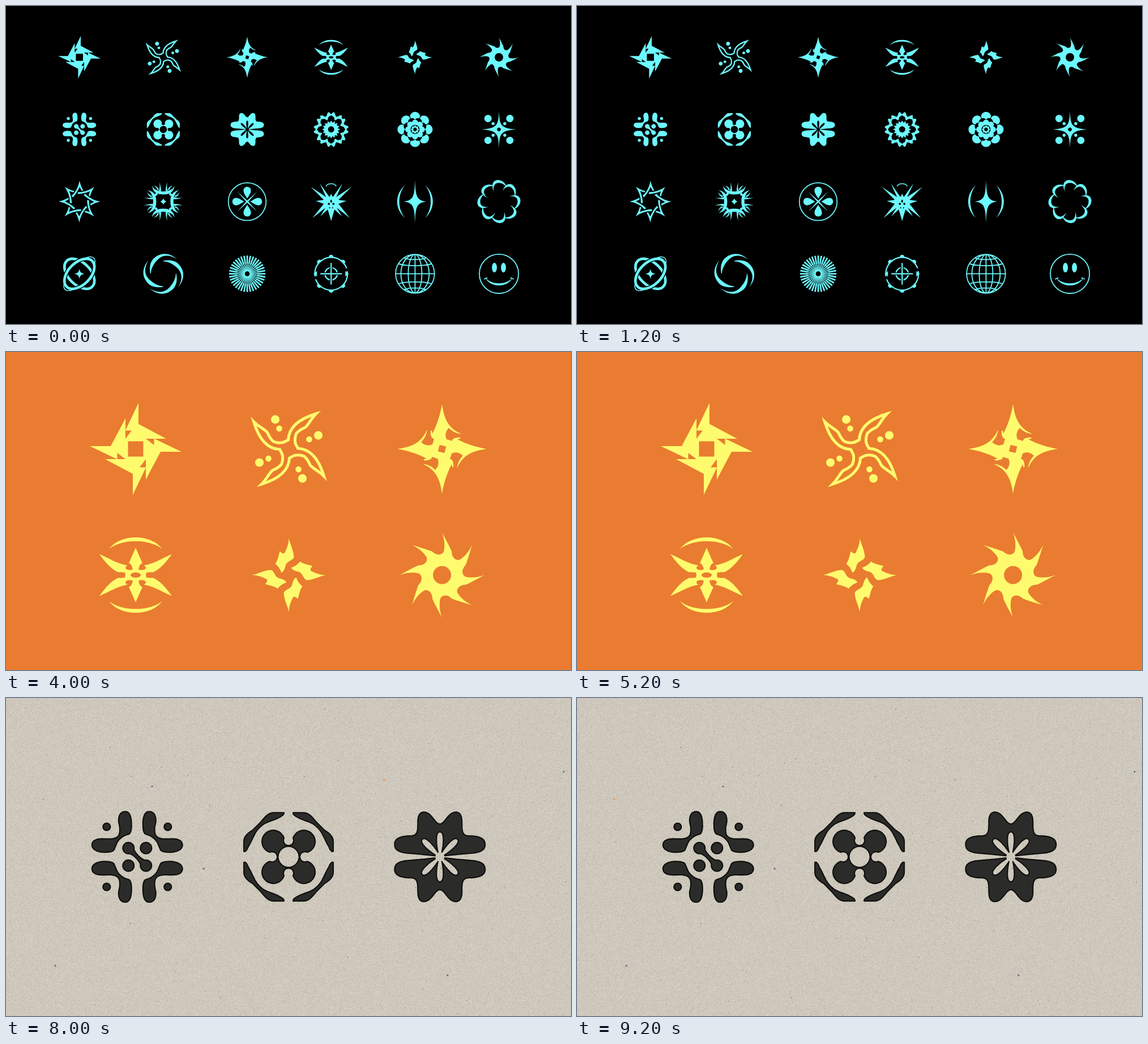
Recreate the animation shown at these times as an HTML page with a canvas. Size 998 by 561 pixels, loop 10000 ms.

```html
<!DOCTYPE html>
<html lang="en">
<head>
<meta charset="utf-8">
<title>Symbol set</title>
<style>
html, body { margin: 0; width: 100%; height: 100%; overflow: hidden; background: #000; }
canvas { display: block; }
</style>
</head>
<body>
<canvas id="stage" width="998" height="561"></canvas>
<script>
const W = 998, H = 561, HOLD = 2000;

// Path helpers: every path is a string of absolute "x y" pairs.
const tf = (d, a, b, c, e, dx = 0, dy = 0) =>
  d.replace(/(-?[\d.]+) (-?[\d.]+)/g, (_, x, y) =>
    (a * x + c * y + dx).toFixed(2) + ' ' + (b * x + e * y + dy).toFixed(2));
const spin = (d, deg) => {
  const t = deg * Math.PI / 180, c = Math.cos(t), s = Math.sin(t);
  return tf(d, c, s, -s, c);
};
const turn = (n, d, start = 0) =>
  Array.from({ length: n }, (_, i) => spin(d, start + i * 360 / n)).join('');
const loop = (n, d) => 'M' + turn(n, d).slice(1) + 'Z';
const flipX = d => d + tf(d, -1, 0, 0, 1);
const flipY = d => d + tf(d, 1, 0, 0, -1);
const quad = d => flipY(flipX(d));
const UNIT = 'M-1 0C-1 -.55 -.55 -1 0 -1C.55 -1 1 -.55 1 0C1 .55 .55 1 0 1C-.55 1 -1 .55 -1 0Z';
const dot = (x, y, r, q = r) => tf(UNIT, r, 0, 0, q, x, y);

const petal = 'M0 0C-4 -10 -9 -43 0 -43C9 -43 4 -10 0 0Z';
const orbit = dot(0, 0, 32, 19.5);

// Each icon: scale, then parts that alternately add and cut.
// A part is a filled path or [path, line width].
const icons = [
  [.4625, loop(4, 'L5 -81L5 -44L54 -18L33 -18'),
    turn(4, 'M18 -18L32.5 -18L32.5 -7Z') + 'M-13.5 -13.5L13.5 -13.5L13.5 13.5L-13.5 13.5Z'],
  [.4625, [loop(4, 'L-1 -16C0 -38 18 -53 48 -62C38 -52 36 -44 29 -38C20 -34 16 -31 13 -27C10 -20 10 -10 14 -5'), 5], '',
    turn(4, dot(-24, -52, 7.5) + dot(-17, -36, 5.3))],
  [.4625, loop(4, 'L0 -79C3 -58 8 -38 33 -27L32 -18L27 -17C40 -10 60 -3 79 0').replace(/Z$/, '') + 'Z',
    turn(4, 'M37 -26C24 -27 17 -32 12 -37C6 -31 5 -24 8 -17L18 -14C18 -19 24 -21 37 -20Z') +
    spin('M-6 -6L6 -6L6 6L-6 6Z', 15)],
  [.4625, flipY('M-47 -46C-27 -73.5 27 -73.5 47 -46C25 -64.5 -25 -64.5 -47 -46Z' +
      'M0 -48L12 -21C8 -20 6 -16 5 -9L-5 -9C-6 -16 -8 -20 -12 -21Z') +
      quad('M64 -37C46 -29 32 -20 15 -17L8 -4L31 -5C44 -11 54 -23 64 -37Z') + dot(0, 0, 20, 10),
    dot(0, 0, 9, 4.5) + flipX(dot(26, 0, 8, 5)) + quad(dot(12, -13, 6, 4))],
  [.4625, turn(4, 'M0 -65C2 -55 8 -45 9 -32C7 -25 -1 -26 -5 -19C-7 -14 -7 -8 -13 -4' +
    'C-15 -10 -18 -15 -24 -20C-20 -24 -18 -35 -16 -42C-12 -38 -8 -36 -6 -42C-2 -50 0 -58 0 -65Z')],
  [.4625, loop(8, 'L0 -75C7 -62 13 -51 17 -42C17 -31 24 -25 31 -27C40 -32 48 -42 53 -53'),
    dot(0, 0, 16)],

  [.364, quad('M-21 -81C-11 -81 -9 -68 -9 -56C-9 -46 -11 -40 -15 -39C-26 -36 -32 -30 -35 -24' +
      'L-40 -12C-42 -8 -50 -7 -58 -7C-70 -7 -81 -12 -81 -21C-81 -30 -72 -33 -62 -33' +
      'C-50 -33 -33 -30 -32 -44C-31 -54 -34 -58 -34 -64C-34 -74 -30 -81 -21 -81Z' + dot(-54, -53, 7.5)) +
    turn(4, dot(15.5, -15.5, 11)) + 'M-7 -20C-5 -8 8 5 20 7L7 20C5 8 -8 -5 -20 -7Z'],
  [.364, quad('M-8 -79L-26 -79C-36 -79 -42 -72 -50 -62L-64 -48C-74 -42 -80 -36 -80 -27L-80 -9' +
      'C-76 -6 -72 -12 -70 -18C-66 -24 -63 -32 -60 -37C-56 -47 -47 -56 -37 -60' +
      'C-30 -63 -18 -66 -9 -73C-7 -76 -6 -78 -8 -79Z' + dot(-27, -27, 21)) +
      'M-26 -26L26 -26L26 26L-26 26Z',
    dot(0, 0, 17.5) + turn(4, dot(0, -29, 8))],
  [.364, flipY(loop(1, 'L0 -59C8 -59 14 -80 28 -80C38 -80 40 -70 40 -62C40 -46 40 -38 52 -38' +
      'C64 -38 81 -36 81 -22C81 -8 66 -6 52 -5C36 -4 22 -2 0 0C-22 -2 -36 -4 -52 -5' +
      'C-66 -6 -81 -8 -81 -22C-81 -36 -64 -38 -52 -38C-40 -38 -40 -46 -40 -62' +
      'C-40 -70 -38 -80 -28 -80C-14 -80 -8 -59 0 -59')),
    turn(4, petal, 45) + turn(2, petal) + dot(0, 0, 8)],
  [.546, loop(8, 'L-17 -41C-12 -46 -14 -54 -8 -56C-4 -56 -4 -50 0 -50C4 -50 4 -56 8 -56C14 -54 12 -46 17 -41'),
    loop(8, 'L-12 -29L-9 -40L0 -46L9 -40L12 -29'),
    loop(16, 'L0 -29L4.3 -21.6'), dot(0, 0, 10)],
  [1, turn(8, dot(0, -22, 9)),
    turn(8, dot(0, -14, 7) + 'M-.6 -33L.6 -33L.6 -16L-.6 -16Z', 22.5) + dot(0, 0, 17),
    turn(8, dot(0, -12, 5.4)) + dot(0, 0, 12), dot(0, 0, 8),
    turn(8, dot(0, -5, 2)) + dot(0, 0, 5), dot(0, 0, 3.2)],
  [1, loop(1, 'L0 -33C1 -8 2.5 -2 30 0C2.5 2 1 8 0 33C-1 8 -2.5 2 -30 0C-2.5 -2 -1 -8 0 -33') +
      dot(0, 0, 5), quad(dot(0, 0, 3)), quad(dot(19.3, -19.3, 6.4) + dot(10.3, -10.3, 2.8))],

  [.1655, turn(8, 'M0 -223C10 -185 22 -150 41 -118L24 -115L2 -156C-18 -112 -40 -76 -70 -45L-83 -62C-40 -100 -8 -165 0 -223Z')],
  [1, turn(4, 'M-20 -28C-15 -14.5 15 -14.5 20 -28C18 -15 9 -12.5 0 -12.5C-9 -12.5 -18 -15 -20 -28Z' +
      flipX('M4 -18C4 -24 5 -29 7 -34C6 -29 6 -23 8 -19Z') +
      'M0 -5L2 -2L5 0L0 0L-5 0L-2 -2Z') +
      turn(4, 'M-4 -20L4 -20L2 -16L-2 -16Z' + flipX('M7 -22C9 -25 9 -28 8 -32C11 -28 11 -23 9 -20Z'), 45)],
  [.546, [dot(0, 0, 61), 3.2], '',
    turn(4, 'M0 -10C-4 -18 -12 -26 -12 -36C-12 -44 -6 -48 0 -48C6 -48 12 -44 12 -36C12 -26 4 -18 0 -10Z') +
    turn(4, 'M0 -45L2.6 0L-2.6 0Z', 45)],
  [1, flipX('M-.3 -14L3 -8L20 -32L9 -8L36 -26L13 -3L27 -1L13 4L33 29L10 11L19 26L6 14L0 34L-.3 34Z'),
    flipX(dot(4, 4, 1.9) + dot(2.6, 11, 1)) + 'M0 -4L2 0L0 2L-2 0Z',
    ['M-9 -27C-6 -33 6 -33 9 -27', 1.5]],
  [1, flipX('M-18 -29C-36 -12 -36 12 -18 29C-31 12 -31 -12 -18 -29Z') +
    loop(1, 'L0 -38C1 -8 3 -2.5 20 0C3 2.5 1 8 0 38C-1 8 -3 2.5 -20 0C-3 -2.5 -1 -8 0 -38')],
  [1, turn(8, 'M-9 -18C-20 -43 10 -44 14 -24C8 -36 -13 -38 -9 -18Z')],

  [1, [spin(orbit, 45), 4.6], [spin(orbit, -45), 7.5], [spin(orbit, -45), 4.6], '',
    [turn(2, 'M-25 -6C-34 -20 -30 -30 -17 -27', 90), 1.5], '',
    loop(4, 'L0 -9C1 -3 3 -1 9 0')],
  [.546, turn(4, 'M-30 -29C-20 -45 -4 -57 12 -57C44 -56 62 -36 65 -2C57 -34 40 -47 14 -45C-4 -44 -18 -38 -28 -29Z', 45)],
  [.546, turn(36, 'M-1.2 -8L-1.5 -33L-2.3 -33L-2.6 -59L2.6 -59L2.3 -33L1.5 -33L1.2 -8Z') + dot(0, 0, 12),
    dot(0, 0, 8)],
  [.546, [dot(0, 0, 53), 4], '', [dot(0, 0, 20), 4], [turn(4, 'M0 0L0 -28'), 9],
    [turn(4, 'M0 0L0 -35'), 4], turn(2, 'M49 -18L60 -18L58 -8L47 -9Z'),
    turn(2, 'M46 -9L57 0L46 9Z') +
    [0, 45, 135, 180, 225, 315].map(a =>
      spin('M-9 -52L-6 -58C-6 -62 6 -62 6 -58L9 -52Z', a)).join('')],
  [1, [dot(0, 0, 34.3) + dot(0, 0, 12, 34) + dot(0, 0, 25, 34) + 'M0 -34L0 34M-34 0L34 0' +
    flipY('M-30 -18C-18 -13 18 -13 30 -18M-20 -28C-10 -24 10 -24 20 -28'), 1.8]],
  [1, [dot(0, 0, 34.6), 1.8], '',
    flipX(dot(8, -11, 4.4, 8.5) + 'M21 6L27 9L26 10L20 8Z') +
    'M-24 7C-15 25 15 25 24 7C13 20 -13 20 -24 7Z']
];

const subpaths = d => d.match(/M[^M]+/g) || [];

function drawIcon(g, id, x, y, size, deg = 0) {
  const [unit, ...parts] = icons[id];
  g.save();
  g.translate(x, y);
  g.rotate(deg * Math.PI / 180);
  g.scale(size * unit, size * unit);
  parts.forEach((part, i) => {
    g.globalCompositeOperation = i % 2 ? 'destination-out' : 'source-over';
    if (Array.isArray(part)) {
      g.lineWidth = part[1];
      g.stroke(new Path2D(part[0]));
    } else {
      subpaths(part).forEach(d => g.fill(new Path2D(d)));
    }
  });
  g.restore();
}

function layer(paint, color = '#000') {
  const c = document.createElement('canvas');
  c.width = W;
  c.height = H;
  const g = c.getContext('2d');
  g.fillStyle = g.strokeStyle = color;
  paint(g);
  return c;
}

function backdrop(g, color) {
  g.globalCompositeOperation = 'destination-over';
  g.fillStyle = color;
  g.fillRect(0, 0, W, H);
}

const grid = layer(g => {
  icons.forEach((_, i) => drawIcon(g, i, 129.7 + i % 6 * 148.2, 90.5 + Math.floor(i / 6) * 127.3, 1));
  backdrop(g, '#000');
}, '#6cf9ff');

const chrome = layer(g => {
  g.fillRect(0, 0, W, H);
  g.translate(499.5, 280);
  const metal = g.createRadialGradient(0, 0, 60, 0, 0, 223);
  ['#5d595b', '#858b8e', '#7b7a7a', '#899295', '#7f7f7e', '#6d7a7f', '#465a62', '#8b9699']
    .forEach((c, i, all) => metal.addColorStop(i / (all.length - 1), c));
  const line = (p, color, width) => {
    g.strokeStyle = color;
    g.lineWidth = width;
    g.stroke(p);
  };
  subpaths(icons[12][1]).forEach(d => {
    const p = new Path2D(d);
    g.save();
    g.clip(p);
    g.fillStyle = metal;
    g.fill(p);
    g.translate(-1, -1);
    line(p, '#3c3f4490', 10);
    line(p, '#f2f4f4', 6);
    g.restore();
    line(p, '#77797c', 1);
  });
});

const orange = layer(g => {
  for (let i = 0; i < 6; i++)
    drawIcon(g, i, 229 + i % 3 * 270.6, i < 3 ? 171 : 393.5, 2.162);
  backdrop(g, '#e97c30');
}, '#fffb6e');

const pink = layer(g => {
  const step = 165.5, half = 145.5;
  const tiles = [[14, 21, 4], [13, 20, 3], [19, 2, 9], [18, 1, 8]];
  const ink = layer(k => {
    for (let j = -1; j < 5; j++)
      for (let i = -1; i < 7; i++) {
        if ((i + j) % 2 === 0) continue;
        const x = 95 + i * step, y = 75 + j * step;
        k.lineWidth = 1.5;
        k.stroke(new Path2D(tf('M0 -1L1 0L0 1L-1 0Z', half, 0, 0, half, x, y)));
        const id = tiles[j] && tiles[j][i >> 1];
        if (i >= 0 && id !== undefined) drawIcon(k, id, x, y, 1.83, -45);
      }
  }, '#ed2f95');
  g.shadowColor = '#ed2f95a0';
  g.shadowBlur = 9;
  g.drawImage(ink, 0, 0);
  g.shadowColor = 'transparent';
  backdrop(g, '#000');
});

let seed = 7;
const rand = () => (seed = (seed * 16807) % 2147483647) / 2147483647;

const paper = layer(g => {
  const img = g.createImageData(W, H), px = img.data;
  for (let i = 0; i < px.length; i += 4) {
    const n = (rand() + rand() - 1) * 17;
    px[i] = 205 + n;
    px[i + 1] = 200 + n;
    px[i + 2] = 187 + n;
    px[i + 3] = 255;
  }
  g.putImageData(img, 0, 0);
  // Fibres
  for (let i = 0; i < 2200; i++) {
    const x = rand() * W, y = rand() * H, a = rand() * 7, r = 1 + rand() * 3;
    g.strokeStyle = rand() < .5 ? '#eeeade70' : '#8f897c60';
    g.lineWidth = .5 + rand() * .6;
    g.beginPath();
    g.moveTo(x, y);
    g.lineTo(x + r * Math.cos(a), y + r * Math.sin(a));
    g.stroke();
  }
  // Specks
  const speck = (color, x, y, r) => {
    g.fillStyle = color;
    g.fill(new Path2D(dot(x, y, r)));
  };
  for (let i = 0; i < 110; i++) speck('#5b574f90', rand() * W, rand() * H, .4 + rand() * .6);
  [[66, 178], [668, 144], [219, 398]].forEach(([x, y]) => speck('#e8763a', x, y, 1.3));
  [[985, 130], [258, 156], [87, 472], [349, 301], [780, 489]].forEach(([x, y]) => speck('#62667a', x, y, 1.6));

  const ink = layer(k => {
    for (let i = 0; i < 3; i++) drawIcon(k, 6 + i, 231.8 + i * 267.3, 280.3, 2.747);
  }, '#0b0b09');
  const core = layer(k => {
    k.drawImage(ink, 0, 0);
    k.globalCompositeOperation = 'destination-in';
    for (let a = 0; a < 8; a++)
      k.drawImage(ink, 1.8 * Math.cos(a * Math.PI / 4), 1.8 * Math.sin(a * Math.PI / 4));
    k.globalCompositeOperation = 'source-in';
    k.fillStyle = '#2b2c29';
    k.fillRect(0, 0, W, H);
  });
  g.drawImage(ink, 0, 0);
  g.drawImage(core, 0, 0);
});

const slides = [grid, chrome, orange, pink, paper];
const screen2d = document.getElementById('stage').getContext('2d');

function frame() {
  const i = Math.floor(performance.now() / HOLD) % slides.length;
  screen2d.drawImage(slides[i], 0, 0);
  requestAnimationFrame(frame);
}
frame();
</script>
</body>
</html>
```
